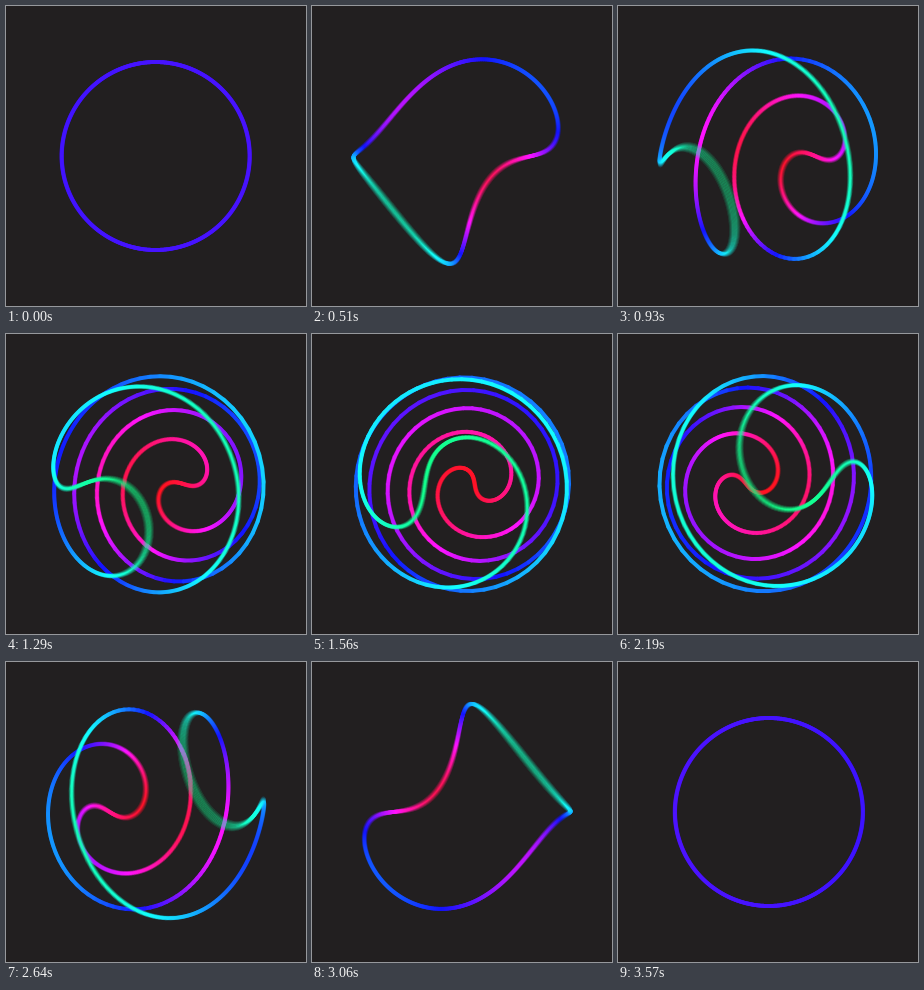
These frames come from a looping animation (300x300 px, 3600 ms). An HTML page with a canvas:

```html
<!DOCTYPE html>
<html lang="en">
<head>
<meta charset="utf-8">
<title>Twisting ring</title>
<style>
  html, body { margin: 0; width: 100%; height: 100%; overflow: hidden; background: #221f20; }
  canvas { display: block; width: 300px; height: 300px; }
</style>
</head>
<body>
<canvas id="stage" width="300" height="300"></canvas>
<script>
const SIZE = 300, BG = '#221f20';
const R = 94, CAMERA = 2 * R, WEIGHT = 4;
const FRAMES = 120, FRAME_MS = 30;
const SAMPLES = 8, SHUTTER = 0.6;
const SEGMENTS = 480, TWIST = 3 * Math.PI;

const stage = document.getElementById('stage').getContext('2d');
const layer = document.createElement('canvas');
layer.width = layer.height = SIZE;
const pen = layer.getContext('2d');
pen.lineWidth = WEIGHT;
pen.lineCap = 'round';

const ease = s => s * s * s * (10 - 15 * s + 6 * s * s);

// A ring twisted about its own axis while that axis tips over by half a turn.
function project(theta, tilt, twist) {
  const along = R * Math.cos(theta), out = R * Math.sin(theta);
  const phi = twist * Math.cos(theta);
  const side = out * Math.sin(phi);
  const c = Math.cos(tilt), s = Math.sin(tilt);
  const z = along * s + side * c;
  const scale = CAMERA / (CAMERA - z);
  return {
    x: SIZE / 2 + (side * s - along * c) * scale,
    y: SIZE / 2 + out * Math.cos(phi) * scale,
    z
  };
}

function drawRing(p) {
  const tilt = Math.PI * p;
  const twist = TWIST * ease(1 - Math.abs(2 * p - 1));
  const points = [];
  for (let i = 0; i <= SEGMENTS; i++) {
    points.push(project(2 * Math.PI * i / SEGMENTS, tilt, twist));
  }
  const parts = [];
  for (let i = 0; i < SEGMENTS; i++) {
    const a = points[i], b = points[i + 1];
    parts.push({ a, b, z: (a.z + b.z) / 2 });
  }
  parts.sort((m, n) => m.z - n.z);

  pen.fillStyle = BG;
  pen.fillRect(0, 0, SIZE, SIZE);
  for (const { a, b, z } of parts) {
    pen.strokeStyle = `hsl(${(253 - 104 * z / R).toFixed(1)}, 100%, 54%)`;
    pen.beginPath();
    pen.moveTo(a.x, a.y);
    pen.lineTo(b.x, b.y);
    pen.stroke();
  }
}

// Motion blur: running average of moments within the open shutter.
function render(frame) {
  for (let i = 0; i < SAMPLES; i++) {
    drawRing((frame + SHUTTER * i / SAMPLES) / FRAMES);
    stage.globalAlpha = 1 / (i + 1);
    stage.drawImage(layer, 0, 0);
  }
}

let shown = -1;
function tick() {
  const frame = Math.floor(performance.now() / FRAME_MS) % FRAMES;
  if (frame !== shown) render(shown = frame);
  requestAnimationFrame(tick);
}
tick();
</script>
</body>
</html>
```
